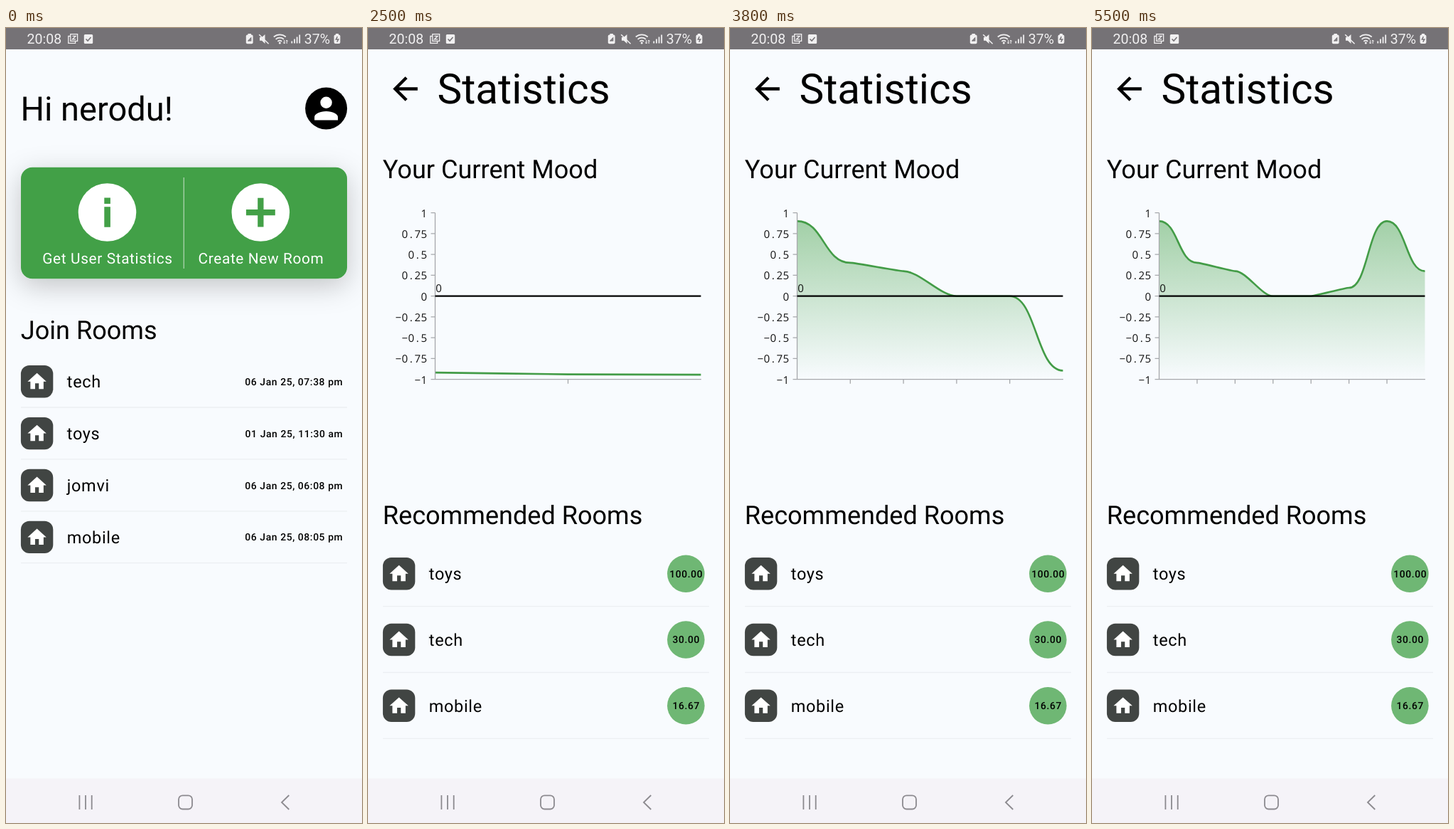
An HTML page for the animation above (7 s loop, 501x1117 px).

```html
<!DOCTYPE html>
<html lang="en">
<head>
<meta charset="utf-8">
<title>Rooms</title>
<style>
  html, body { margin: 0; width: 100%; height: 100%; overflow: hidden; background: #f8fbfe; }
  svg { display: block; width: 100vw; height: 100vh; }
  text { font-family: Roboto, sans-serif; fill: #000; text-rendering: geometricPrecision; }
  .display { font-size: 58.5px; }
  .greeting { font-size: 47px; }
  .heading { font-size: 36.1px; }
  .name { font-size: 23.5px; letter-spacing: .65px; }
  .action { font-size: 20.8px; letter-spacing: .65px; fill: #fff; text-anchor: middle; }
  .small { font-size: 13.9px; font-weight: 500; letter-spacing: .6px; }
  .end { text-anchor: end; }
  .mid { text-anchor: middle; }
  .axis { font: 15px "Open Sans", sans-serif; text-anchor: middle; fill: #111; }
  .status { font-size: 19.5px; fill: #f1f0f1; }
</style>
</head>
<body>
<svg viewBox="0 0 501 1117">
  <defs>
    <filter id="shadow" x="-20%" y="-50%" width="140%" height="220%">
      <feDropShadow dx="0" dy="10" stdDeviation="19" flood-color="#000" flood-opacity=".22"/>
    </filter>
    <linearGradient id="fade" gradientUnits="userSpaceOnUse" x1="0" y1="259.7" x2="0" y2="493.7">
      <stop offset="0" stop-color="#43a047" stop-opacity=".5"/>
      <stop offset="1" stop-color="#43a047" stop-opacity="0"/>
    </linearGradient>
    <g id="house">
      <rect x="-22.7" y="-22.7" width="45.4" height="45.4" rx="12" fill="#414543"/>
      <path transform="scale(1.32) translate(-12 -12)" fill="#fff" d="M10 20v-6h4v6h5v-8h3L12 3 2 12h3v8z"/>
    </g>
  </defs>
  <rect width="501" height="1117" fill="#f8fbfe"/>

  <g id="home">
    <text class="greeting" x="20.5" y="129.5">Hi nerodu!</text>
    <circle cx="450.6" cy="113" r="29.5"/>
    <path fill="#fff" transform="translate(450.6 113) scale(2.06) translate(-12 -12)"
      d="M12 4a4 4 0 1 1 0 8a4 4 0 1 1 0-8m0 10c4.42 0 8 1.79 8 4v2H4v-2c0-2.21 3.58-4 8-4z"/>
    <rect x="21" y="195.7" width="459" height="156.6" rx="16" fill="#43a047" filter="url(#shadow)"/>
    <path d="M250.3 210V338" stroke="#a3cfa6" stroke-width="1.4"/>
    <g fill="#fff"><circle cx="142.5" cy="259" r="40.8"/><circle cx="358.3" cy="259" r="40.8"/></g>
    <path fill="#43a047" d="M138.3 238.5h8.6v8.4h-8.6zM138.3 251.3h8.6v28.4h-8.6zM354.2 238.7h8.3v16.2h16.3v8.3h-16.3v16.2h-8.3v-16.2h-16.3v-8.3h16.3z"/>
    <text class="action" x="143" y="331">Get User Statistics</text>
    <text class="action" x="359" y="331">Create New Room</text>
    <text class="heading" x="20.8" y="437">Join Rooms</text>
    <g id="rooms"></g>
  </g>

  <g id="stats">
    <path transform="translate(26 59.2) scale(2.19)"
      d="M20 11v2H8l5.5 5.5-1.42 1.42L4.16 12l7.92-7.92L13.5 5.5 8 11h12z"/>
    <text class="display" x="97.4" y="105.6">Statistics</text>
    <text class="heading" x="20.8" y="211.3">Your Current Mood</text>
    <g id="chart">
      <path id="area" fill="url(#fade)"/>
      <path id="line" fill="none" stroke="#439c47" stroke-width="2.6"/>
      <path id="axes" fill="none" stroke="#a6a8ab" stroke-width="1.3"/>
      <path d="M94.5 376.6H468.5" stroke="#000" stroke-width="2.3"/>
      <text class="axis" x="99.5" y="370.8">0</text>
      <g id="labels"></g>
    </g>
    <text class="heading" x="20.8" y="697.3">Recommended Rooms</text>
    <g id="picks"></g>
  </g>

  <g id="statusbar">
    <rect width="501" height="30" fill="#757276"/>
    <text class="status" x="29.6" y="21.8">20:08</text>
    <text class="status" x="419.8" y="21.8">37%</text>
    <g fill="none" stroke="#f1f0f1" stroke-width="1.3">
      <path d="M90.5 11.5H87.8V21.3H97.6V18.6M90.8 8.6H100.6V18.4H90.8zM93.5 11.3h4.6l-4.6 4.6h4.6"/>
      <path d="M376.8 12.5a13 13 0 0 1 17 0M379.6 15.8a8.8 8.8 0 0 1 11.4 0M382.4 18.8a4.6 4.6 0 0 1 5.8 0" stroke-width="1.7"/>
      <path d="M391.6 22v-5m-1.5 3.4 1.5 1.6 1.5-1.6M395.2 17v5m-1.5-3.4 1.5-1.6 1.5 1.6" stroke-width="1"/>
      <path d="M402.3 21.5v-3M406 21.5v-6M409.6 21.5v-9M413.2 21.5v-12" stroke-width="1.8"/>
    </g>
    <g fill="#f1f0f1">
      <rect x="109.8" y="9" width="12.4" height="13" rx="1.5"/>
      <rect x="337.8" y="9.6" width="9.8" height="12.6" rx="2"/><rect x="340.5" y="8" width="4.4" height="2"/>
      <path d="M357 13h3l4.5-4v13l-4.5-4.2h-3z"/>
      <circle cx="385.3" cy="21" r="1.5"/>
      <rect x="461.6" y="9.6" width="8.8" height="12.4" rx="2"/><rect x="464" y="8" width="4" height="2"/>
    </g>
    <g fill="none" stroke="#757276" stroke-width="1.5">
      <path d="M112.5 15.4l2.6 2.7 4.4-5M340.6 18.5l4-4.2v3.5h-3M466.4 12l-2 4h3.4l-2 3.6"/>
    </g>
    <path d="M356.2 9.2l13.4 13" stroke="#f1f0f1" stroke-width="1.5"/>
  </g>

  <g id="navbar">
    <rect y="1054.5" width="501" height="62.5" fill="#f5f3f8"/>
    <g fill="none" stroke="#8c8a8f" stroke-width="1.8">
      <path d="M103.4 1078V1098M112 1078V1098M120.7 1078V1098M398.3 1078L388 1088L398.3 1098"/>
      <rect x="243" y="1078.3" width="19" height="19.2" rx="5.5"/>
    </g>
  </g>
</svg>
<script>
const $ = id => document.getElementById(id);
const LOOP = 7000, RISE = 400;
const LEFT = 94.5, WIDTH = 374, BASE = 493.7, HEIGHT = 234;
const yOf = v => BASE - HEIGHT * (v + 1) / 2;

const row = (y, name, divider) =>
  `<use href="#house" x="43.6" y="${y}"/>
   <text class="name" x="85.8" y="${y + 8.3}">${name}</text>
   <path d="M21 ${divider}H480" stroke="#eceff2" stroke-width="1.3"/>`;

$('rooms').innerHTML = [
  ['tech', '06 Jan 25, 07:38 pm'],
  ['toys', '01 Jan 25, 11:30 am'],
  ['jomvi', '06 Jan 25, 06:08 pm'],
  ['mobile', '06 Jan 25, 08:05 pm']
].map(([name, date], i) => {
  const y = 496.7 + 72.9 * i;
  return row(y, name, y + 36.3) + `<text class="small end" x="474.3" y="${y + 5}">${date}</text>`;
}).join('');

$('picks').innerHTML = [['toys', '100.00'], ['tech', '30.00'], ['mobile', '16.67']]
  .map(([name, score], i) => {
    const y = 766.7 + 92.8 * i;
    return row(y, name, y + 46) +
      `<circle cx="447.4" cy="${y}" r="26.3" fill="#6fb774"/>
       <text class="small mid" x="447.8" y="${y + 4.9}">${score}</text>`;
  }).join('');

// Axis labels sit on a 9px character grid, right aligned.
const levels = Array.from({ length: 9 }, (_, i) => 1 - i / 4);
$('labels').innerHTML = levels.map(v => {
  const s = String(v).replace('-', '\u2212');
  const xs = [...s].map((_, i) => 78.8 - 9 * (s.length - 1 - i));
  return `<text class="axis" x="${xs.join(' ')}" y="${yOf(v) + 5.8}">${s}</text>`;
}).join('');

// Each update shows more of the moods; new points rise from the bottom.
const moods = [.9, .4, .3, 0, 0, .1, .9, .3];
const updates = [[2450, 3], [2910, 5], [3730, 6], [4860, 8]];

// Cubic Bezier easing (.4, 0, .2, 1)
function ease(x) {
  if (x >= 1) return 1;
  let lo = 0, hi = 1;
  for (let i = 0; i < 20; i++) {
    const s = (lo + hi) / 2, r = 1 - s;
    if (1.2 * r * r * s + .6 * r * s * s + s ** 3 < x) lo = s; else hi = s;
  }
  return 3 * (1 - lo) * lo * lo + lo ** 3;
}

function drawChart(data) {
  const step = WIDTH / (data.length - 1);
  let curve = `M${LEFT} ${yOf(data[0])}`;
  let axes = `M${LEFT} ${yOf(1)}V${BASE}H469`;
  for (const v of levels) axes += `M88.5 ${yOf(v)}H${LEFT}`;
  for (let i = 1; i < data.length; i++) {
    const x = LEFT + step * i, y0 = yOf(data[i - 1]), y = yOf(data[i]);
    // steeper segments bend more
    const bend = step / 2 * Math.min(1, 4 * Math.abs(y - y0) / HEIGHT);
    curve += `C${x - step + bend} ${y0} ${x - bend} ${y} ${x} ${y}`;
    if (i < data.length - 1) axes += `M${x} ${BASE}v6`;
  }
  $('line').setAttribute('d', curve);
  $('area').setAttribute('d', `${curve}V${BASE}H${LEFT}Z`);
  $('axes').setAttribute('d', axes);
}

const show = (id, on) => $(id).setAttribute('display', on ? 'inline' : 'none');

function render(t) {
  show('home', t < 2200);
  show('stats', t >= 2200);
  const now = updates.findLastIndex(u => t >= u[0]);
  show('chart', now >= 0);
  if (now < 0) return;
  const [start, count] = updates[now];
  const known = now > 0 ? updates[now - 1][1] : 0;
  const rise = ease((t - start) / RISE);
  drawChart(moods.slice(0, count).map((v, i) => i < known ? v : -1 + (v + 1) * rise));
}

let begin;
function tick(now) {
  begin ??= now;
  render((now - begin) % LOOP);
  requestAnimationFrame(tick);
}
render(0);
requestAnimationFrame(tick);
</script>
</body>
</html>
```
